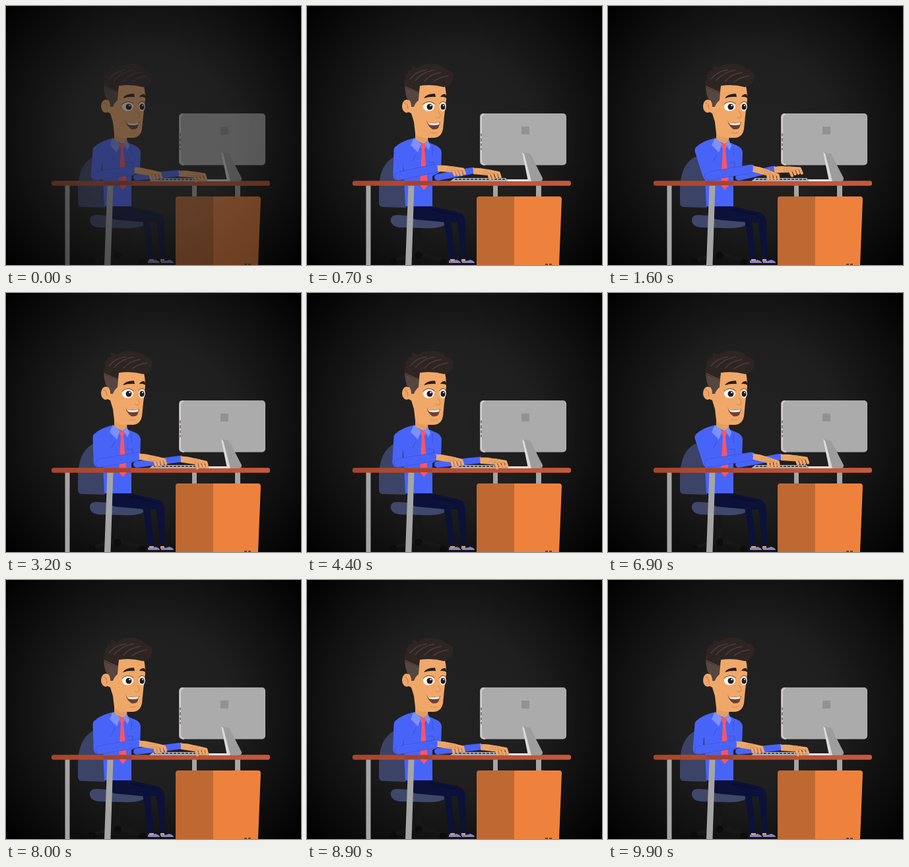
These frames come from a looping animation (447x393 px, 10 s). An HTML page:

```html
<!DOCTYPE html>
<html lang="en">
<head>
<meta charset="utf-8">
<title>Typing at the desk</title>
<style>
  html, body { margin: 0; width: 100%; height: 100%; overflow: hidden; background: #000; }
  svg { display: block; width: 100vw; height: 100vh; }
  .line { fill: none; stroke-linecap: round; stroke-linejoin: round; }
</style>
</head>
<body>
<svg viewBox="0 0 447 393" preserveAspectRatio="none">
  <defs>
    <radialGradient id="room" gradientUnits="userSpaceOnUse" cx="223" cy="196" r="300">
      <stop offset="0" stop-color="#222"/>
      <stop offset=".4" stop-color="#1f1f1f"/>
      <stop offset=".72" stop-color="#0f0f0f"/>
      <stop offset="1" stop-color="#000"/>
    </radialGradient>
    <linearGradient id="wood">
      <stop offset="0" stop-color="#a8442b"/>
      <stop offset="1" stop-color="#c65a3b"/>
    </linearGradient>
    <path id="palm" d="M-2-4Q8-5 17-3Q27-3 32 1L27 5Q20 7 14 6L-2 5Z" fill="#eda667"/>
  </defs>
  <rect width="447" height="393" fill="url(#room)"/>

  <g id="scene">
    <!-- chair -->
    <path d="M165 336h8v36l34 12v4l-38-9-38 9v-4l34-12z" fill="#171717"/>
    <g fill="#0c0c0c">
      <circle cx="131" cy="388" r="5.5"/><circle cx="169" cy="378" r="5.500"/><circle cx="206" cy="389" r="5.500"/>
    </g>
    <path d="M132 229Q110 240 109 277L109 299Q109 304 114 305L150 306V229Z" fill="#3b4366"/>
    <path d="M127 323Q128 317 137 317L199 321Q209 325 208 333Q199 338 176 337L140 336Q126 334 127 323Z" fill="#3f476b"/>

    <!-- legs and shoes -->
    <path d="M150 303L188 304 229 313Q239 316 240 326L241 385H234L228 328H218L225 385H216L208 328 165 324Q150 320 150 303Z" fill="#0b1138"/>
    <path d="M188 309L226 317" class="line" stroke="#070b28" stroke-width="1"/>
    <path d="M217 384h7v4h-7zM234 384h6v4h-6z" fill="#dc9c68"/>
    <path d="M215 386Q223 388 226 385Q233 387 233 390H215ZM235 386Q243 388 247 385Q254 387 254 390H235Z" fill="#8b83c4"/>

    <!-- torso -->
    <path d="M160 201Q147 204 137 211L133 222 146 240 149 304H190V258L203 251 204 222Q203 215 196 212L182 206Z" fill="#4864f8"/>
    <path d="M184 237h8v9M165 225l-5 10M190 214v13" class="line" stroke="#3650d5" stroke-width="1"/>
    <path d="M164 180L184 190 183 206 176 209 164 203Z" fill="#e39d60"/>
    <path d="M173 209h6l1 5-2 3 5 55-6 7-6-7 3-55-2-3z" fill="#fa5468"/>
    <path d="M162 200L173 209 168 222 157 211ZM183 203L187 212 184 219 178 209Z" fill="#7c91ff"/>

    <!-- head -->
    <ellipse cx="151" cy="152" rx="7" ry="10" fill="#eda667"/>
    <path d="M148 147q5 1 5 9" class="line" stroke="#c97f48" stroke-width="1.2"/>
    <path d="M154 140L170 119 208 119Q211 126 211 142L208 167 206 187Q204 199 193 200L178 200Q168 199 164 193L162 176 158 163 154 161Z" fill="#f0a869"/>
    <path d="M148 122Q149 135 152 141Q158 143 158 153H162Q164 147 169 143L171 120Z" fill="#56463f"/>
    <path d="M148 123Q146 115 151 109Q147 105 153 102Q152 97 160 97L159 90 168 94Q178 86 193 88Q207 90 210 96Q218 98 222 104Q220 107 221 111Q219 121 207 123Q190 118 171 121L169 132Z" fill="#2e2523"/>
    <path d="M156 111Q165 99 181 97M164 113Q175 100 193 97M178 114Q187 103 203 101M191 115Q200 108 214 106" class="line" stroke="#493d39" stroke-width="1.5"/>
    <path d="M149 122L169 131" class="line" stroke="#765548" stroke-width="1"/>
    <path d="M177 140Q181 133 194 133L195 138Q186 137 177 140ZM202 138Q205 133 210 134L212 140Q207 137 202 138Z" fill="#291d1b"/>
    <ellipse cx="184.500" cy="152.500" rx="8.500" ry="7" fill="#fff"/>
    <ellipse cx="206" cy="152.500" rx="4.800" ry="7" fill="#fff"/>
    <path d="M176 149Q184 142 193 148M201 148Q206 142 211 148" class="line" stroke="#6b402d" stroke-width="1"/>
    <circle cx="186" cy="153" r="4.500" fill="#2a1713"/>
    <ellipse cx="206" cy="153" rx="3.500" ry="4.500" fill="#2a1713"/>
    <circle cx="187.500" cy="151" r="1.200" fill="#fff"/><circle cx="207" cy="151" r="1" fill="#fff"/>
    <path d="M199 160Q205 168 199 170L195 169M187 192Q192 194 197 192M181 174l2 3" class="line" stroke="#d48c54" stroke-width="1.1"/>
    <path d="M182 177Q192 179 202 176L199 185Q196 188 190 187Q185 184 182 177Z" fill="#6d4034"/>
    <path d="M183 177Q192 179 201 176.500L200 180Q192 182 185 180Z" fill="#f4ece8"/>

    <!-- desk -->
    <path d="M89.500 272h7v121h-7zM282 272h7v18h-7zM347 272h8v18h-8zM153.500 272h9l-4 121h-9.500z" fill="#a5a5a5"/>
    <path d="M261 289H314V393H257V293Q257 289 261 289Z" fill="#bf6932"/>
    <path d="M314 289H382Q386 289 386 293L382 393H314Z" fill="#ee823d"/>
    <path d="M361 391h4v2h-4zm6 0h4v2h-4z" fill="#713d20"/>
    <rect x="69" y="265.300" width="331" height="7.400" rx="3" fill="url(#wood)"/>
    <path d="M148 266H190V272H148Z" fill="#85342d" opacity=".3"/>
    <path d="M172 272h11l-6 7z" fill="#fa5468"/>

    <!-- monitor and keyboard -->
    <rect x="262" y="163" width="131" height="78.500" rx="5" fill="#ababab"/>
    <path d="M268 164Q264 165 264 171V233Q264 240 269 241" class="line" stroke="#d5cdce" stroke-width="2"/>
    <path d="M264 194v3m0 4v4m0 4v3m0 4v2" class="line" stroke="#666" stroke-width="1.5"/>
    <rect x="325" y="183" width="12" height="12" fill="#929292"/>
    <path d="M303 263H341V266H303Z" fill="#e8e2e2"/>
    <path d="M326 222L338 224 357 261Q358 266 352 266H337Z" fill="#9d9d9d"/>
    <path d="M326 222L329 224 340 266H335Z" fill="#e0d9da"/>
    <path d="M223 261H301L305 266H217Z" fill="#b0b0b4"/>
    <path d="M224 263H302" stroke="#494b50" stroke-width="2" stroke-dasharray="4 2"/>

    <!-- arms -->
    <g id="far"></g>
    <g id="near"></g>
  </g>
</svg>
<script>
const LOOP = 10000, CYCLE = 4800, FADE = 300;
// time, near wrist x, y, tilt, far wrist x, y, tilt
const poses = [
  [0, 197, 249, 5, 264, 254, 0],
  [300, 197, 249, 5, 264, 254, 0],
  [700, 200, 246, 0, 254, 250, 2],
  [1600, 222, 247, 12, 254, 248, -5],
  [2100, 222, 248, 10, 264, 249, 0],
  [3200, 204, 248, 5, 267, 252, 5],
  [CYCLE, 197, 249, 5, 264, 254, 0]
];
const scene = document.getElementById('scene');
const near = document.getElementById('near');
const far = document.getElementById('far');

function poseAt(t) {
  const next = poses.findIndex(p => p[0] > t);
  const a = poses[next - 1], b = poses[next];
  const u = (t - a[0]) / (b[0] - a[0]);
  const ease = (1 - Math.cos(Math.PI * u)) / 2;
  return a.map((v, i) => v + (b[i] - v) * ease);
}

const line = (d, color, width) =>
  `<path class="line" d="${d}" stroke="${color}" stroke-width="${width}"/>`;

function handAt(x, y, tilt, t) {
  let fingers = '';
  for (let i = 0; i < 4; i++) {
    const tap = Math.sin(t / 400 * 2 * Math.PI + i * 1.7) * 0.8;
    const d = `M${14 + i * 4} ${2 - i * .6}L${21 + i * 5.2} ${3 - i * .4}L${24 + i * 5} ${11 - i * .9 + tap}`;
    fingers += line(d, '#c9824d', 4.4) + line(d, '#f0a869', 3.5);
  }
  return `<g transform="translate(${x} ${y}) rotate(${tilt})"><use href="#palm"/>${fingers}</g>`;
}

function forearm(x0, y0, x, y, width) {
  const d = `M${x0} ${y0}L${x - 5} ${y}`;
  return line(d, '#344ecf', width + 1.2) + line(d, '#4864f8', width) +
    line(`M${x - 2} ${y - 4}L${x} ${y + 4}`, '#6f86ff', 2.5);
}

function draw(t) {
  const [, nx, ny, nTilt, fx, fy, fTilt] = poseAt(t % CYCLE);
  const elbow = 136 + (nx - 197) * 0.6;
  scene.setAttribute('opacity', Math.min(1, 0.43 + 0.57 * t / FADE));
  far.innerHTML = forearm(198, 260, fx, fy, 9) + handAt(fx, fy, fTilt, t + 150);
  near.innerHTML = line(`M139 219L${elbow} 257`, '#4864f8', 15) +
    forearm(elbow + 2, 258, nx, ny, 12) + handAt(nx, ny, nTilt, t);
}

const start = performance.now();
function tick() {
  draw((performance.now() - start) % LOOP);
  requestAnimationFrame(tick);
}
tick();
</script>
</body>
</html>
```
